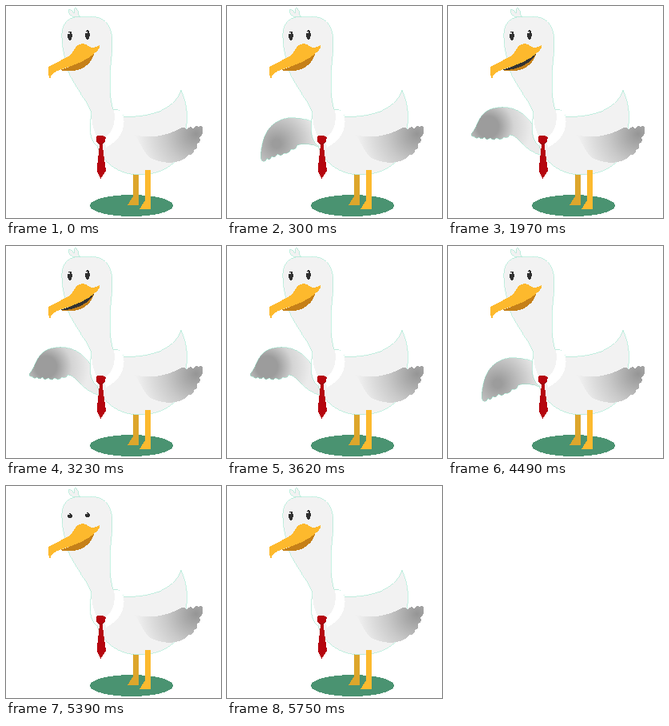
An HTML page for the animation above (6.62 s loop, 269 by 265 pixels).

```html
<!DOCTYPE html>
<html>
<head>
<meta charset="utf-8">
<style>
html, body { margin: 0; width: 100%; height: 100%; overflow: hidden; background: #fff; }
svg { display: block; width: 100vw; height: 100vh; shape-rendering: crispEdges; }
.plume { fill: #f2f2f2; }
.rim { stroke: #8ce6c8; stroke-width: .5; }
</style>
</head>
<body>
<svg viewBox="0 0 269 265">
  <defs>
    <radialGradient id="foldShade" gradientUnits="userSpaceOnUse" cx="238" cy="160" r="74">
      <stop offset="0" stop-color="#959595"/><stop offset=".5" stop-color="#c8c8c8"/><stop offset="1" stop-color="#f0f0f0"/>
    </radialGradient>
    <radialGradient id="midShade" gradientUnits="userSpaceOnUse" cx="62" cy="172" r="54">
      <stop offset=".1" stop-color="#9c9c9c"/><stop offset="1" stop-color="#ebebeb"/>
    </radialGradient>
    <radialGradient id="highShade" gradientUnits="userSpaceOnUse" cx="50" cy="151" r="54">
      <stop offset=".25" stop-color="#9c9c9c"/><stop offset=".6" stop-color="#d4d4d4"/><stop offset="1" stop-color="#ebebeb"/>
    </radialGradient>
  </defs>

  <ellipse cx="157" cy="249.500" rx="52" ry="13.500" fill="#4a9371"/>
  <path fill="#dda62c" d="M159 208H165.500V248.500L152 249L159 238Z"/>

  <path id="midWing" class="rim" fill="url(#midShade)" d="M118 152C106 142 92 139 76 140C56 143 45 158 42.500 182
    Q41 192 44.500 194Q49 195 50 190Q53 195 56 188Q60 191 63 185Q68 189 71 184Q77 186 80 179
    Q86 181 88 174Q98 170 118 177Z"/>
  <path id="highWing" class="rim" fill="url(#highShade)" d="M116 158C104 148 98 134 82 128.500C66 124 51 127 43 136
    C36 145 34 155 29 160Q29 164 33 163Q34 167 39 164Q41 168 46 164Q48 169 53 165
    Q56 169 61 165Q66 169 70 164Q76 166 77 161C88 161 94 181 118 187Z"/>

  <path class="plume rim" d="M86 14C79 12 77 7 79 4Q83 5 85 9Q84 4 87 2Q91 5 91 11L93 14Z"/>
  <path class="plume rim" d="M77 80C74 64 70 54 70 40C69 25 75 13.500 92 13.500H106C124 13 133 25 133 46
    C133 62 130 74 130 95C130 108 131 120 134 129Q144 128 147 138C175 140 211 131 219 105
    C227 123 229 142 223 162C224 190 203 211 165 211C139 210 121 195 114 175
    C104 168 104 152 107 134C102 118 85 100 77 80Z"/>
  <path fill="#fff" d="M135 130Q144 128 147 138Q151 163 125 177L123 165Q139 154 135 130Z
    M107 137Q108 154 114 164V174Q103 167 107 137Z"/>

  <path fill="#fcba2f" d="M174 205H180.500L181.500 254H167L174.500 242Z"/>

  <path fill="url(#foldShade)" d="M161 161C177 166 200 163 216 154Q222 150 226 154Q231 149 234 153
    Q239 148 241 151Q247 148 246 155Q247 161 242 164Q245 170 239 172Q241 178 235 180
    Q235 186 229 186C216 200 195 197 181 190C172 184 168 170 161 161Z"/>

  <path fill="#b5060f" d="M113 163Q119 160 125 164L124 169L120.500 173L125 206L118.500 216L113.500 206L117 173L113 170Z"/>
  <path fill="none" stroke="#86050c" stroke-width=".8" d="M115 171Q119 174 123 170"/>

  <path fill="#c58019" d="M67 80Q93 73 111 57Q108 72 93 79Q81 83 67 80Z"/>
  <path id="mouth" fill="#333" d="M68 80Q93 72 110 60Q106 68 95 74Q81 81 68 80Z"/>
  <path fill="#fdb92d" d="M55 91Q52 86 53.500 76L76 64C86 60 84 48 96 47C104 47 103 57 117 49
    Q118 53 112 58C102 68 86 74 67 80Q57 83 55 91Z"/>

  <g class="eye"><ellipse cx="80" cy="37.300" rx="2.700" ry="6" fill="#303030"/><circle cx="79" cy="34" r=".8" fill="#ddd"/></g>
  <g class="eye"><ellipse cx="102" cy="36.200" rx="2.700" ry="6" fill="#303030"/><circle cx="101" cy="33" r=".8" fill="#ddd"/></g>
</svg>
<script>
const LOOP = 6620;
const [midWing, highWing, mouth] = ['midWing', 'highWing', 'mouth'].map(id => document.getElementById(id));
const eyes = [...document.querySelectorAll('.eye')];
const eyeY = [37.3, 36.2];

// Each track is a list of [start, value]; the value holds until the next start.
const wingTrack = [[0, 0], [100, 1], [200, 2], [300, 3], [400, 4], [4490, 3], [4590, 2], [4690, 1], [4790, 0]];
const mouthTrack = [[0, 0], [1970, 1], [2600, 0], [3230, 1], [3360, 0], [3490, 1], [3620, 0]];
const blinkAt = t => [[t, .5], [t + 100, .12], [t + 200, .5], [t + 330, 1]];
const eyeTrack = [[0, 1], ...blinkAt(970), ...blinkAt(5390)];

const wingAngle = [0, -60, -35, 0];
const valueAt = (track, t) => track.findLast(([start]) => start <= t)[1];
const show = (el, on) => el.setAttribute('visibility', on ? 'visible' : 'hidden');

function draw(t) {
  const wing = valueAt(wingTrack, t);
  show(midWing, wing > 0 && wing < 4);
  show(highWing, wing === 4);
  midWing.setAttribute('transform', `rotate(${wingAngle[wing] || 0} 112 155)`);
  show(mouth, valueAt(mouthTrack, t));
  const open = valueAt(eyeTrack, t);
  eyes.forEach((eye, i) =>
    eye.setAttribute('transform', `translate(0 ${eyeY[i] * (1 - open)}) scale(1 ${open})`));
}

const start = performance.now();
function tick() {
  draw((performance.now() - start) % LOOP);
  requestAnimationFrame(tick);
}
tick();
</script>
</body>
</html>
```
